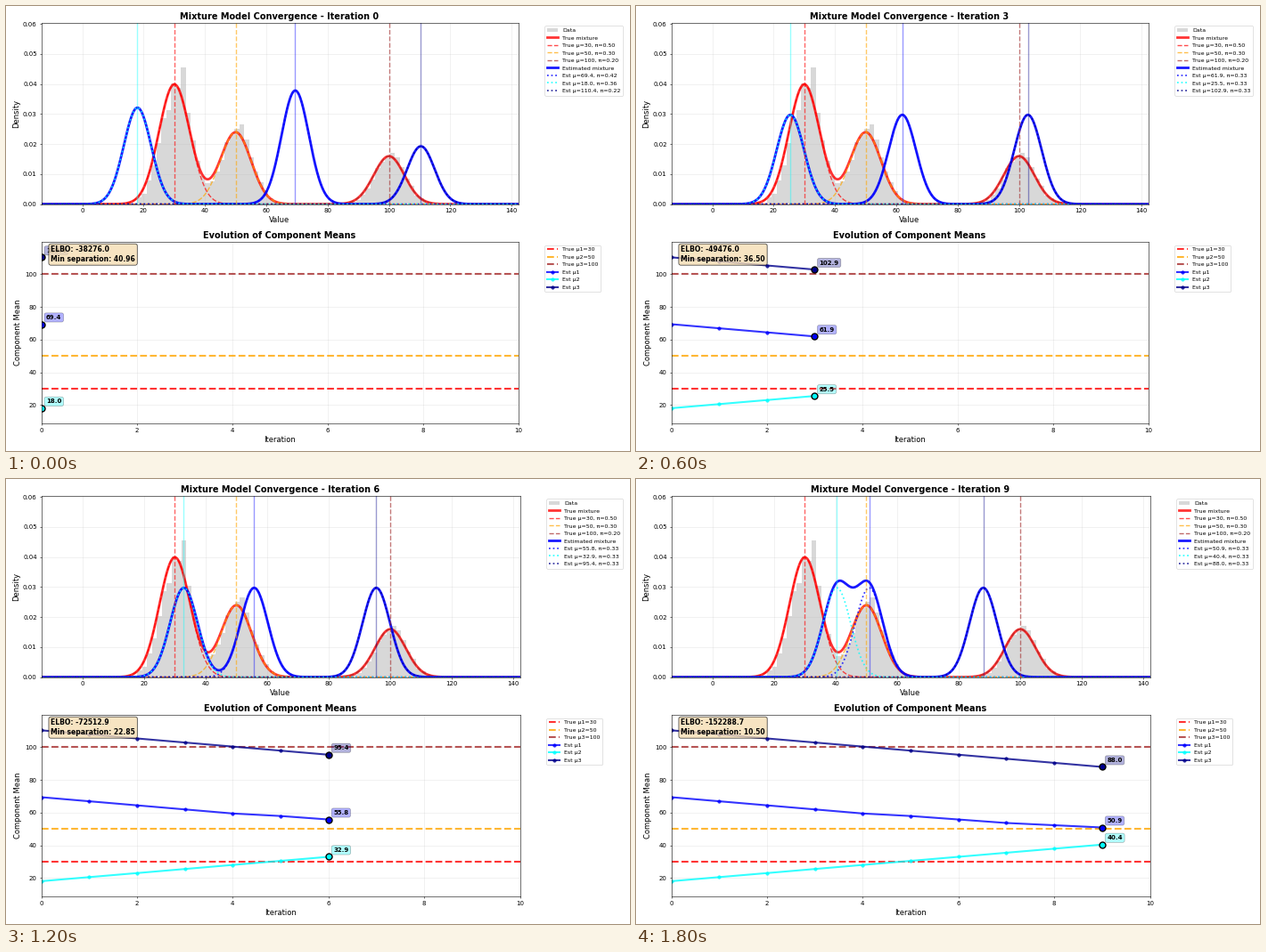
These frames come from a looping animation (700x500 px, 2000 ms). A matplotlib script:

```python
import numpy as np
import matplotlib.pyplot as plt
from matplotlib.animation import FuncAnimation

FRAMES = 10
TRUE_MU = [30, 50, 100]
TRUE_PI = [0.5, 0.3, 0.2]
TRUE_SD = 5
EST_SD = np.sqrt(20)
TRUE_COLORS = ["red", "orange", "brown"]
EST_COLORS = ["blue", "cyan", "darkblue"]

X = np.linspace(-13.4, 142.1, 1000)
STEPS = np.arange(FRAMES)

# The outer means drift at a steady rate; the first one slows down
MEANS = np.array([
    np.interp(STEPS, [0, 4, 5, 7, 9], [69.43, 59.452, 57.91, 53.64, 50.89]),
    17.98 + 2.49 * STEPS,
    110.386 - 2.4905 * STEPS,
])
ELBO = np.interp(STEPS, [0, 1, 2, 4, 5, 7, 9],
                 [-38276.0, -41667.3, -44931.9, -54020.1,
                  -60940.2, -84085.6, -152288.7])

fig, (ax1, ax2) = plt.subplots(2, 1, figsize=(14, 10), dpi=50)


def normal(x, mu, sd):
    return np.exp(-0.5 * ((x - mu) / sd) ** 2) / (sd * np.sqrt(2 * np.pi))


def sample_histogram():
    """Bin edges, centers and noisy densities of the observed data."""
    rng = np.random.default_rng(3)
    edges = np.linspace(17.85, 113.0, 61)
    centers = (edges[:-1] + edges[1:]) / 2
    heights = sum(w * normal(centers, mu + 0.6, 4.8)
                  for mu, w in zip(TRUE_MU, TRUE_PI))
    return edges, centers, heights * rng.normal(1, 0.07, len(centers))


EDGES, CENTERS, HEIGHTS = sample_histogram()


def est_weights(i):
    """The third weight shrinks until the mixture resets to equal parts."""
    if i > 2:
        return [1 / 3] * 3
    second = 0.36 + 0.014 * i * (2 - i)
    third = 0.216 - 0.07 * i
    return [1 - second - third, second, third]


def decorate(ax, title, xlabel, ylabel):
    ax.set_title(title, fontsize=14, fontweight="bold")
    ax.set_xlabel(xlabel, fontsize=12)
    ax.set_ylabel(ylabel, fontsize=12)
    ax.grid(True, alpha=0.3)
    ax.legend(bbox_to_anchor=(1.05, 1), loc="upper left", fontsize=9)


def draw_mixture(total, part, mus, weights, sd, colors, digits, total_style, part_style):
    curves = [w * normal(X, mu, sd) for mu, w in zip(mus, weights)]
    ax1.plot(X, sum(curves), lw=4, label=total, **total_style)
    for curve, mu, w, color in zip(curves, mus, weights, colors):
        ax1.plot(X, curve, color=color, label=f"{part} μ={mu:.{digits}f}, π={w:.2f}",
                 **part_style)


def draw_density(i):
    ax1.clear()
    ax1.hist(CENTERS, bins=EDGES, weights=HEIGHTS, color="gray", alpha=0.3,
             label="Data")
    draw_mixture("True mixture", "True", TRUE_MU, TRUE_PI, TRUE_SD, TRUE_COLORS, 0,
                 dict(color="red", alpha=0.8), dict(ls="--", lw=2, alpha=0.7))
    draw_mixture("Estimated mixture", "Est", MEANS[:, i], est_weights(i), EST_SD,
                 EST_COLORS, 1,
                 dict(color="blue", alpha=0.9), dict(ls=":", lw=2.5, alpha=0.8))
    for mu, color in zip(TRUE_MU, TRUE_COLORS):
        ax1.axvline(mu, color=color, ls="--", lw=2, alpha=0.6)
    for mu, color in zip(MEANS[:, i], EST_COLORS):
        ax1.axvline(mu, color=color, lw=2, alpha=0.4)
    ax1.set_xlim(X[0], X[-1])
    ax1.set_ylim(0, 0.0603)
    decorate(ax1, f"Mixture Model Convergence - Iteration {i}", "Value", "Density")


def draw_means(i):
    ax2.clear()
    for k, (mu, color) in enumerate(zip(TRUE_MU, TRUE_COLORS), 1):
        ax2.axhline(mu, color=color, ls="--", lw=3, alpha=0.8,
                    label=f"True μ{k}={mu}")
    for k, (path, color) in enumerate(zip(MEANS, EST_COLORS), 1):
        ax2.plot(STEPS[:i + 1], path[:i + 1], "o-", color=color, lw=3,
                 ms=5, alpha=0.8, label=f"Est μ{k}")
    for path, color in zip(MEANS, EST_COLORS):
        ax2.scatter(i, path[i], s=100, color=color, edgecolors="black",
                    linewidths=2, zorder=2.5)
        ax2.annotate(f"{path[i]:.1f}", (i, path[i]), xytext=(8, 8),
                     textcoords="offset points", fontsize=10, fontweight="bold",
                     bbox=dict(boxstyle="round,pad=0.3", facecolor=color, alpha=0.3))
    gap = np.diff(np.sort(MEANS[:, i])).min()
    ax2.text(0.02, 0.98, f"ELBO: {ELBO[i]:.1f}\nMin separation: {gap:.2f}",
             transform=ax2.transAxes, va="top", fontsize=11, fontweight="bold",
             bbox=dict(boxstyle="round", facecolor="wheat", alpha=0.8))
    ax2.set_xlim(0, 10)
    margin = 0.1 * np.ptp(MEANS)
    ax2.set_ylim(MEANS.min() - margin, MEANS.max() + margin)
    decorate(ax2, "Evolution of Component Means", "Iteration", "Component Mean")


def fit_layout():
    """Measure text at double resolution, where its size is less rounded."""
    dpi = fig.dpi
    fig.set_dpi(2 * dpi)
    # The legends scale with the axes, so a second pass settles the layout
    for _ in range(2):
        fig.tight_layout()
    fig.set_dpi(dpi)


def update(i):
    draw_density(i)
    draw_means(i)
    fit_layout()


anim = FuncAnimation(fig, update, frames=FRAMES, interval=200,
                     init_func=lambda: None, repeat=True, repeat_delay=0)
plt.show()
```
